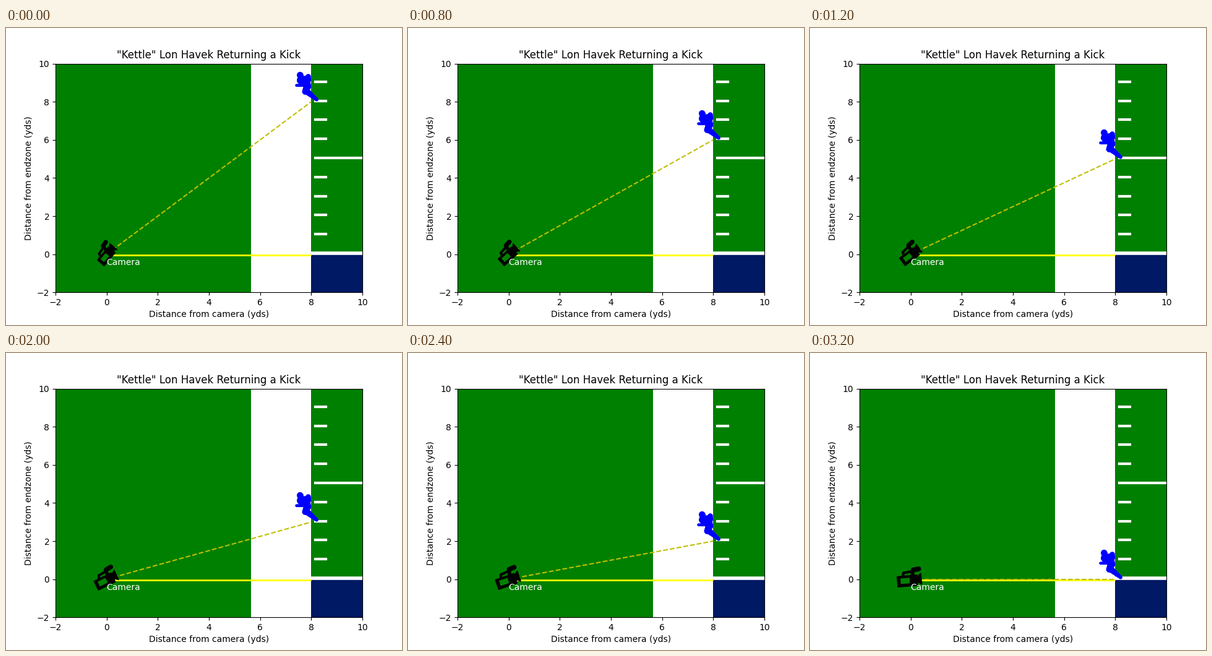
Animation, 640 px wide and 480 px high, one loop 3.6 s. Source, as a matplotlib script:

```python
import numpy as np
import matplotlib.pyplot as plt
from matplotlib.animation import FuncAnimation
from matplotlib.patches import Rectangle
from matplotlib.path import Path
from matplotlib.transforms import Affine2D

plt.rcParams["font.family"] = "DejaVu Sans"
DPI = 100
FRAMES = 9
SIDELINE = 8
TILT = np.radians(5)


def polygon(xy):
    return Path(np.vstack([xy, xy[:1]]), closed=True)


def box(x0, x1, y0, y1, hole=False):
    xy = np.array([(x0, y0), (x1, y0), (x1, y1), (x0, y1)], float)
    return polygon(xy[::-1] if hole else xy)


def limb(p, q, rp, rq=None):
    """Rounded stroke from p to q, tapering from radius rp to rq."""
    rq = rp if rq is None else rq
    heading = np.arctan2(q[1] - p[1], q[0] - p[0])
    a = heading + np.linspace(-np.pi / 2, np.pi / 2, 13)
    arc = np.column_stack([np.cos(a), np.sin(a)])
    return polygon(np.vstack([q + rq * arc, p - rp * arc]))


# Both figures are in pixels around their marker position, y up
camera_shape = Path.make_compound_path(
    box(-20.5, 11.5, -13, 3.8),
    box(-16.2, 0, -9.3, 1.1, hole=True),
    polygon(np.array([(9, -5), (18.2, -12), (18.2, 6), (9, -1)], float)),
    limb((-11.3, 4), (-9.2, 8.8), 1.4),
    limb((-9.2, 8.8), (4, 10.2), 1.4),
    limb((4.5, 4), (5.5, 12), 2.3),
    limb((6.4, 12.4), (15.3, 13.2), 3.2),
)
runner_shape = Path.make_compound_path(
    limb((-18.2, 43.4), (-17.8, 42.6), 4.6),     # head
    limb((-17, 35), (-7.5, 36), 5.8),            # shoulders
    limb((-5, 41), (-6, 36), 3.6, 5),            # raised arm
    limb((-23.8, 26.8), (-14, 26.8), 1.7),       # hand
    limb((-9, 35), (-6.5, 25), 6, 5.4),          # torso
    limb((-6.5, 25), (-10, 16.7), 5.4, 4.3),     # thigh
    limb((-7, 16.7), (8.5, 3.8), 4.5, 2.2),      # leg
)

fig, ax = plt.subplots(figsize=(6.4, 4.8), dpi=DPI)
ax.set(xlim=(-2, 10), ylim=(-2, 10),
       xlabel="Distance from camera (yds)",
       ylabel="Distance from endzone (yds)",
       title='"Kettle" Lon Havek Returning a Kick')


def block(x0, x1, y0, y1, color):
    ax.add_patch(Rectangle((x0, y0), x1 - x0, y1 - y0, color=color, lw=0))


def level(x0, x1, y, color, lw, cap="projecting"):
    ax.plot([x0, x1], [y, y], color=color, lw=lw, solid_capstyle=cap)


block(-2, 5.65, -2, 10, "green")
block(SIDELINE, 10, 0, 10, "green")
block(SIDELINE, 10, -2, 0, "#001964")

# Yard marks, full lines every five yards, and the goal line
for yard in range(11):
    level(8.16, 10 if yard % 5 == 0 else 8.57, yard + 0.05, "white", 3)
level(SIDELINE, 10, 0.05, "white", 4, "butt")

level(0.2, SIDELINE, -0.05, "yellow", 2, "butt")
sight, = ax.plot([], [], "y--")

camera, = ax.plot([-0.03], [0.1], ls="", marker=camera_shape, ms=30,
                  color="black")
runner_size = 2 * np.abs(runner_shape.vertices).max() * 72 / DPI
runner, = ax.plot([], [], ls="", marker=runner_shape, ms=runner_size,
                  color="blue")
ax.text(0, -0.57, "Camera", color="white")


def update(i):
    y = FRAMES - 1 - i
    sight.set_data([0, SIDELINE], [0, y])
    runner.set_data([SIDELINE], [y])
    # Marker paths are rescaled to their largest coordinate after turning
    turn = Affine2D().rotate(np.arctan2(y, SIDELINE) + TILT)
    camera.set_marker(camera_shape.transformed(turn))
    return sight, runner, camera


anim = FuncAnimation(fig, update, frames=FRAMES, interval=400, repeat=True,
                     repeat_delay=0)
plt.show()
```
